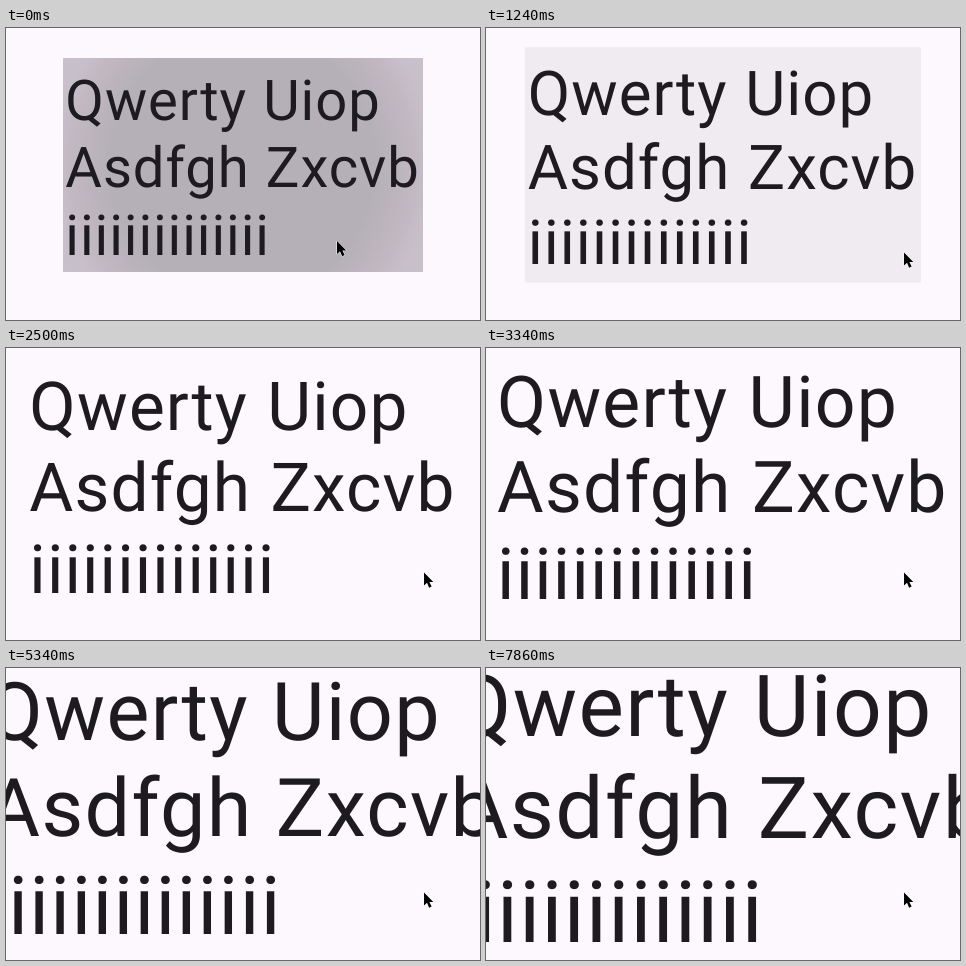
Recreate the animation shown at these times as an HTML page. Size 474 by 292 pixels, loop 8000 ms.

```html
<!DOCTYPE html>
<html lang="en">
<head>
<meta charset="utf-8">
<title>Growing text</title>
<style>
  html, body { margin: 0; width: 100%; height: 100%; overflow: hidden; background: #fdf8fd; }
  svg { display: block; width: 100vw; height: 100vh; }
  text {
    font: 400 56.2px Roboto, sans-serif;
    letter-spacing: .95px;
    word-spacing: 1.2px;
    fill: #1d1b20;
    text-rendering: geometricPrecision;
  }
</style>
</head>
<body>
<svg viewBox="0 0 474 292">
  <defs>
    <radialGradient id="ripple" gradientUnits="userSpaceOnUse" cx="0" cy="0" r="208">
      <stop offset="0" stop-color="#b5b0b8"/>
      <stop offset=".64" stop-color="#b5b0b8"/>
      <stop offset=".83" stop-color="#c2b8c2"/>
      <stop offset="1" stop-color="#c8c1cc" stop-opacity="0"/>
    </radialGradient>
  </defs>
  <g id="label">
    <rect id="highlight" x="-180" y="-107" width="360" height="214" fill="#c8c1cc"/>
    <rect id="splash" x="-180" y="-107" width="360" height="214" fill="url(#ripple)"/>
    <text x="-177.7" y="-45.4">Qwerty Uiop</text>
    <text x="-177.7" y="21.5">Asdfgh Zxcvb</text>
    <text x="-177.7" y="89.8">iiiiiiiiiiiiii</text>
  </g>
  <path id="pointer" d="M0 0V13L3 10.3L5.2 15.2L7.6 14.1L5.4 9.4H9.3Z"
        fill="#000" stroke="#fff" stroke-width="1" paint-order="stroke" stroke-linejoin="round"/>
</svg>
<script>
const LOOP = 8000;
const GROWTH = 0.00382;
const MAX_SCALE = 1.523;
const [label, highlight, splash, pointer] =
  ['label', 'highlight', 'splash', 'pointer'].map(id => document.getElementById(id));

const clamp = v => Math.min(1, Math.max(0, v));
const smooth = v => v * v * (3 - 2 * v);

// Three updates per 140 ms: two short ones, then a long hold.
function stepAt(ms) {
  const rest = ms % 140;
  return Math.floor(ms / 140) * 3 + (rest >= 20) + (rest >= 120);
}

function draw(now) {
  const step = stepAt(now % LOOP);
  const scale = Math.min(MAX_SCALE, 1 + GROWTH * step);
  label.setAttribute('transform', `translate(237 137) scale(${scale})`);
  highlight.setAttribute('opacity', clamp(1 - step / 35));
  splash.setAttribute('opacity', clamp(1 - step / 20));

  const move = smooth(clamp((step - 1) / 15));
  pointer.setAttribute('transform', `translate(${331 + 87 * move} ${213 + 11.5 * move})`);
}

const start = performance.now();
function tick() {
  draw(performance.now() - start);
  requestAnimationFrame(tick);
}
tick();
</script>
</body>
</html>
```
